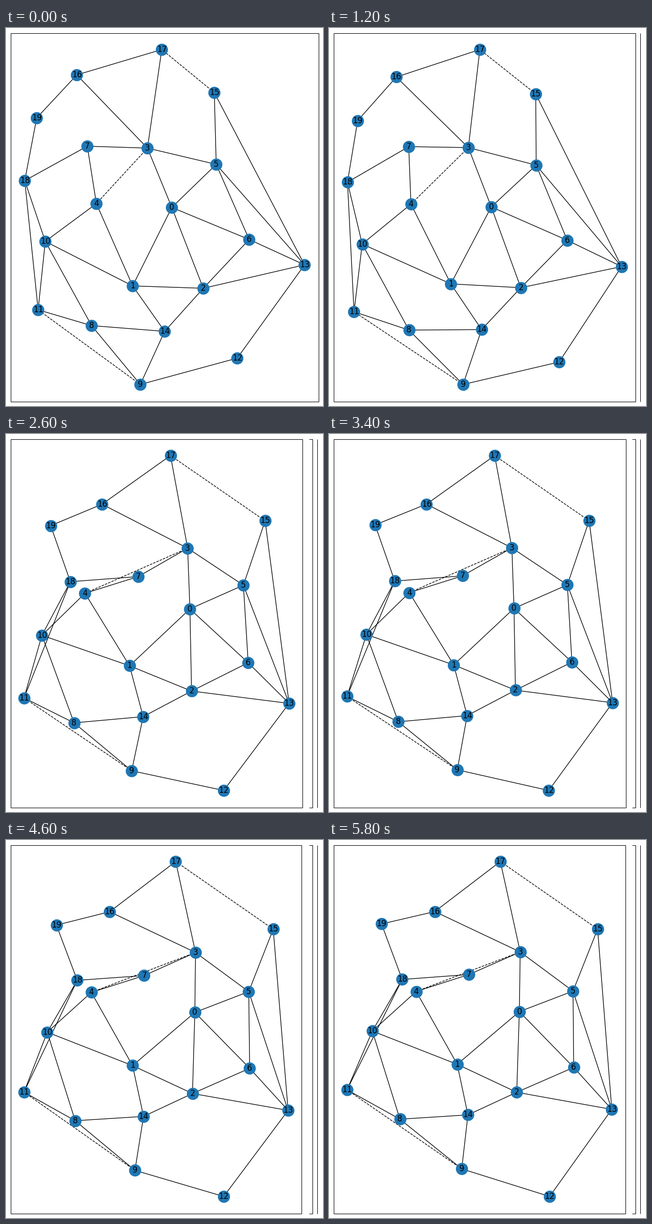
Write a matplotlib script that moves like this. It is 664 px wide and 790 px high and loops after 6 s.

```python
import numpy as np
import matplotlib.pyplot as plt
from matplotlib.animation import FuncAnimation
from matplotlib.collections import LineCollection

W, H, DPI = 664, 790, 100
FRAMES, INTERVAL = 30, 200
LEFT, TOP, BOTTOM = 10, 11, 781
TOP_NODE, SPAN = 45, 700

# First layout, x + iy
START = np.array(
    [347, 265, 413, 296, 189, 440, 509, 170, 179, 281,
     82, 67, 484, 625, 332, 436, 148, 326, 39, 64]
) + 1j * np.array(
    [375, 539, 544, 251, 367, 285, 442, 247, 622, 745,
     446, 589, 690, 495, 634, 135, 98, 45, 319, 188])

# Solid links as walks through the graph
WALKS = [
    (17, 16, 19, 18, 7, 3, 16), (17, 3, 5, 15, 13, 5, 0, 3), (0, 6, 5),
    (0, 1, 2, 0), (6, 2, 13, 6), (1, 4, 10, 1, 14, 2), (4, 7),
    (18, 10, 11, 18), (10, 8, 11), (8, 14, 9, 8), (9, 12, 13),
]
SOLID = [pair for walk in WALKS for pair in zip(walk, walk[1:])]
DASHED = [(3, 4), (9, 11), (15, 17)]

# The graph is a linkage: each rigid group turns about its pivot.
# (pivot, group, degrees: squeezed, turned, relaxed, settled, creep)
JOINTS = [
    (1, [0, 2, 3, 5, 6, 13, 14, 15], (1.2, 18.4, 20.2, 23, 0.2)),
    (1, [4, 10], (-2.8, -6.8, -7.8, -5.6, 0)),
    (14, [8], (-4.9, -7.6, -9.6, -8.1, 0)),
    (14, [9], (-6, -9.2, -12.7, -15.6, -2.5)),
    (10, [11], (0.9, 9, 10, 15.3, 2.1)),
    (10, [18], (5.3, 49.3, 46.7, 48.8, 0)),
    (3, [16, 17], (-1.6, -17, -18.8, -20.6, -0.1)),
    (3, [7], (-0.9, -43, -31.6, -26, 0.5)),
    (16, [19], (-1.4, 19.1, 24.4, 32.9, 1)),
    (13, [12], (-2.6, 1.9, 1.1, 1, -1.3)),
]


def turn(n, squeezed, turned, relaxed, settled, creep):
    """Angle at frame n: hard hops with slow creep in between."""
    if n < 3:
        return 0.12 * n * squeezed
    if n < 7:
        return squeezed * (1 - 0.02 * (6 - n))
    if n < 13:
        return turned + 0.1 * (n - 10) * (relaxed - turned)
    if n < 18:
        return relaxed + creep * (n - 13) / 6
    return settled + creep * (n - 23) / 6


def layout(n):
    """Node positions and the right border, fitted to a fixed height."""
    z = START.copy()
    for pivot, group, angles in JOINTS:
        spin = np.exp(1j * np.radians(turn(n, *angles)))
        z[group] = z[pivot] + (START[group] - START[pivot]) * spin
    z *= SPAN / np.ptp(z.imag)
    width = np.ptp(z.real)
    x = z.real - z.real.min() + LEFT + 0.05 * width
    y = z.imag - z.imag.min() + TOP_NODE
    return np.column_stack([x, y]), LEFT + 0.5 + 1.1 * width


fig = plt.figure(figsize=(W / DPI, H / DPI), dpi=DPI, facecolor="white")
ax = fig.add_axes([0, 0, 1, 1])
ax.set_xlim(0, W)
ax.set_ylim(H, 0)
ax.axis("off")


def border(xs, ys):
    return ax.plot(xs, ys, color="black", lw=0.8, solid_capstyle="butt",
                   solid_joinstyle="miter")[0]


def links(style):
    lines = LineCollection([], colors="black", linewidths=1,
                           linestyles=style, zorder=3)
    return ax.add_collection(lines, autolim=False)


frame_box = border([], [])
# Pieces of wider borders that stay behind as the picture narrows
old_line = border([652, 652], [TOP, BOTTOM])
old_bracket = border([635, 642, 642, 635], [TOP, TOP, BOTTOM, BOTTOM])
solid, dashed = links("solid"), links("dashed")
nodes = ax.scatter(START.real, START.imag, s=300, color="#1f77b4",
                   linewidths=1, zorder=4)
labels = [ax.text(0, 0, str(i), size=12, family="DejaVu Sans", ha="center",
                  va="center", zorder=5) for i in range(len(START))]


def draw(n):
    pos, right = layout(n)
    frame_box.set_data([LEFT, right, right, LEFT, LEFT],
                       [TOP, TOP, BOTTOM, BOTTOM, TOP])
    old_line.set_visible(n >= 3)
    old_bracket.set_visible(n >= 7)
    solid.set_segments(pos[np.array(SOLID)])
    dashed.set_segments(pos[np.array(DASHED)])
    nodes.set_offsets(pos)
    for label, p in zip(labels, pos):
        label.set_position(p)
    return [frame_box, old_line, old_bracket, solid, dashed, nodes, *labels]


anim = FuncAnimation(fig, draw, frames=FRAMES, interval=INTERVAL,
                     repeat=True, repeat_delay=0, blit=False)
plt.show()
```
